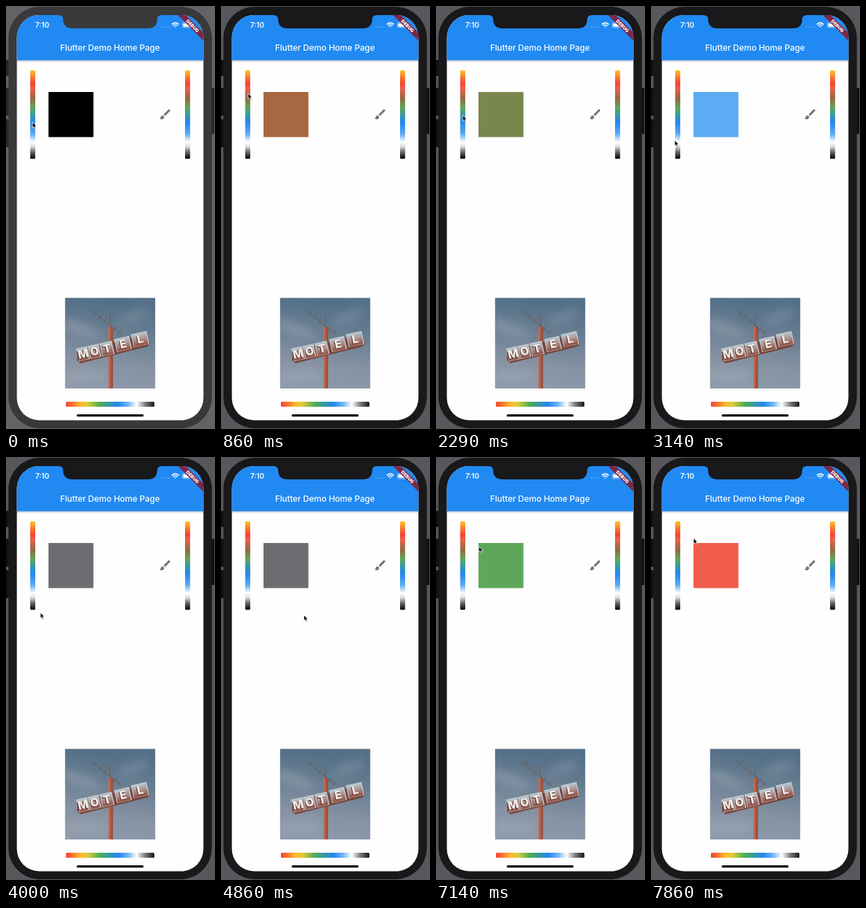
Recreate the animation shown at these times as an HTML page. Size 300 px wide and 605 px high, loop 8000 ms.

```html
<!DOCTYPE html>
<html lang="en">
<head>
<meta charset="utf-8">
<title>Color slider demo</title>
<style>
  html, body { margin: 0; width: 100%; height: 100%; overflow: hidden; background: #58585c; }
  svg { display: block; width: 100%; height: 100%; }
  text { font-family: Inter, Roboto, sans-serif; fill: #fff; }
</style>
</head>
<body>
<svg viewBox="0 0 300 605">
  <defs>
    <linearGradient id="column" x2="0" y2="1"></linearGradient>
    <linearGradient id="row"></linearGradient>
    <linearGradient id="shade" x2="0" y2="1">
      <stop stop-color="#000" stop-opacity=".25"/>
      <stop offset="1" stop-color="#000" stop-opacity="0"/>
    </linearGradient>
    <linearGradient id="sky" x2="-.15" y2="1">
      <stop stop-color="#547088"/>
      <stop offset=".35" stop-color="#6d8195"/>
      <stop offset=".65" stop-color="#8793a3"/>
      <stop offset="1" stop-color="#909caf"/>
    </linearGradient>
    <linearGradient id="panel" x2="0" y2="1">
      <stop stop-color="#b9c4cc"/>
      <stop offset=".5" stop-color="#a88e8b"/>
      <stop offset="1" stop-color="#934f43"/>
    </linearGradient>
    <linearGradient id="pole">
      <stop stop-color="#c8735a"/>
      <stop offset="1" stop-color="#93432f"/>
    </linearGradient>
    <filter id="soft" x="-50%" y="-50%" width="200%" height="200%"><feGaussianBlur stdDeviation="6"/></filter>
    <clipPath id="screen"><rect x="15.6" y="12.9" width="267.8" height="579.6" rx="32"/></clipPath>
    <clipPath id="frame"><rect x="84.8" y="417.6" width="129.4" height="129.4"/></clipPath>
  </defs>

  <rect id="desk" width="300" height="605"/>
  <g id="buttons">
    <path d="M0 77h6v23H0zM0 117h6v40H0zM0 162h6v40H0zM294 117h5v66h-5z"/>
  </g>
  <rect id="body" x="3.5" y="1" width="292" height="603" rx="45"/>

  <g clip-path="url(#screen)">
    <rect x="15" y="12" width="269" height="581" fill="#fefefe"/>
    <rect x="15" y="77" width="269" height="4" fill="url(#shade)"/>
    <rect x="15" y="12" width="269" height="65.6" fill="#2089f2"/>
    <path id="notch" d="M75 12v1q7 0 7 6 0 13 14 13h107q14 0 14-13 0-6 7-6v-1z"/>

    <text x="42" y="31.2" font-size="10.3" font-weight="600">7:10</text>
    <text x="149.2" y="64" font-size="12" font-weight="500" text-anchor="middle">Flutter Demo Home Page</text>
    <path d="M223 30h12" stroke="#8fc4f9" stroke-width="1.4" stroke-linecap="round" stroke-dasharray="0 3.6"/>
    <g fill="none" stroke="#fff" stroke-width="1.6">
      <path d="M238 26.3q5-4.4 10 0M239.8 28.4q3.2-2.8 6.4 0"/>
      <path d="M241.6 29.6L243 31.2l1.4-1.6z" fill="#fff" stroke="none"/>
    </g>
    <rect x="253" y="23.5" width="15" height="7.5" rx="2" fill="none" stroke="#a5d0fa" stroke-width=".8"/>
    <rect x="254.3" y="24.8" width="12.4" height="4.9" rx="1" fill="#fff"/>
    <g transform="translate(283.4 12.9) rotate(45)">
      <rect x="-27" y="18.1" width="54" height="7.8" fill="#7d2745"/>
      <text y="24.4" font-size="6.6" font-weight="900" text-anchor="middle">DEBUG</text>
    </g>

    <rect x="34.7" y="92" width="7.3" height="126.5" rx="1.5" fill="url(#column)"/>
    <rect x="257" y="92" width="7.3" height="126.5" rx="1.5" fill="url(#column)"/>
    <rect x="86" y="566" width="127" height="7.3" rx="1.5" fill="url(#row)"/>
    <rect id="swatch" x="61" y="123" width="64.5" height="64.5"/>
    <path transform="translate(219 145.2) scale(.8)" fill="#757575" d="M7 14c-1.66 0-3 1.34-3 3 0 1.31-1.16 2-2 2 .92 1.22 2.49 2 4 2 2.21 0 4-1.79 4-4 0-1.66-1.34-3-3-3zm13.71-9.37l-1.34-1.34c-.39-.39-1.02-.39-1.41 0L9 12.25 11.75 15l8.96-8.96c.39-.39.39-1.02 0-1.41z"/>

    <g clip-path="url(#frame)">
      <rect x="84" y="417" width="131" height="131" fill="url(#sky)"/>
      <g filter="url(#soft)">
        <ellipse cx="106" cy="462" rx="30" ry="9" fill="#8b98a7" opacity=".7" transform="rotate(20 106 462)"/>
        <ellipse cx="184" cy="444" rx="24" ry="9" fill="#8090a1" opacity=".5" transform="rotate(-20 184 444)"/>
        <ellipse cx="112" cy="528" rx="34" ry="8" fill="#a0a9b6" opacity=".5"/>
      </g>
      <path d="M122 435l44 35M149.5 442v18M126 443l6-8M133 448l6-8M140 454l5-8M154 465l5-6M160 470l5-6" stroke="#6b594f" stroke-width=".9" fill="none"/>
      <rect x="147" y="459" width="6.5" height="90" fill="url(#pole)"/>
      <path d="M102 494L200 469l7 13-4 5-96 24-5-4z" fill="#78443a"/>
      <g id="sign"></g>
    </g>
    <rect x="101.5" y="584" width="96" height="3.3" rx="1.6"/>
  </g>

  <path id="cursor" d="M0 0v8.2l1.9-1.7 1.3 2.9 1.5-.7-1.3-2.8h2.5z" stroke="#fff" stroke-width=".8"/>
</svg>

<script>
const LOOP = 8000;
const STEPS = 56;
const $ = id => document.getElementById(id);

const columnStops = [
  [0, '#ffc526'], [.08, '#f77932'], [.15, '#f4432f'], [.2, '#f15d4b'], [.32, '#94693f'], [.43, '#5ea75a'],
  [.51, '#3798a6'], [.59, '#2187f0'], [.72, '#5cabf3'], [.81, '#ffffff'], [.86, '#dfdee0'],
  [.92, '#6c6d70'], [1, '#000000']
];
const rowStops = [
  [0, '#f44336'], [.08, '#f9772e'], [.16, '#fdb62b'], [.24, '#e0cb37'], [.31, '#9abd45'], [.38, '#4caf50'],
  [.49, '#3798a6'], [.59, '#2187f0'], [.7, '#6cb4f5'], [.8, '#ffffff'], [.9, '#77777a'], [1, '#17171a']
];

// time, cursor x, cursor y, position on the column gradient
const track = [
  [0, 38, 166, 1], [290, 38, 166, 1], [430, 38, 164, .59], [1000, 39, 112, .2],
  [1290, 40, 98, .06], [1430, 41, 106, .06], [1570, 42, 126, .08], [3140, 34, 192, .72],
  [3860, 38, 222, .92], [4860, 119, 226, .92], [5860, 172, 226, .86],
  [7140, 61.5, 128, .43], [7860, 61, 116, .2], [8000, 61, 116, .2]
];

// Linear lookup in rows sorted by their first entry
function lerpRows(rows, key) {
  const i = Math.max(1, rows.findIndex(row => row[0] >= key));
  const a = rows[i - 1], b = rows[i];
  const k = (key - a[0]) / (b[0] - a[0]);
  return a.slice(1).map((v, n) => v + (b[n + 1] - v) * k);
}

const rgb = hex => [1, 3, 5].map(i => parseInt(hex.slice(i, i + 2), 16));
const columnRgb = columnStops.map(([at, hex]) => [at, ...rgb(hex)]);

function fillGradient(id, stops) {
  $(id).innerHTML = stops.map(([at, c]) => `<stop offset="${at}" stop-color="${c}"/>`).join('');
}

function play(id, frameAt) {
  const frames = [];
  for (let i = 0; i <= STEPS; i++) {
    if (i === 1) continue; // the opening pose lasts two ticks
    const time = Math.round(i * LOOP / STEPS / 10) * 10;
    frames.push({ ...frameAt(time), offset: time / LOOP, easing: 'step-end' });
  }
  $(id).animate(frames, { duration: LOOP, iterations: Infinity });
}

fillGradient('column', columnStops);
fillGradient('row', rowStops);

const letters = [['M', 110.5, 497.5, 16], ['O', 127, 494, 16], ['T', 145, 490, 18], ['E', 168, 483.5, 22], ['L', 192.5, 476.5, 23]];
$('sign').innerHTML = letters.map(([letter, x, y, w]) => `
  <g transform="translate(${x} ${y}) rotate(-13)" font-size="16" text-anchor="middle">
    <rect x="${-w / 2}" y="-9.5" width="${w}" height="19" fill="#c0cad1"/>
    <rect x="${1 - w / 2}" y="-8" width="${w - 2.5}" height="17" fill="url(#panel)"/>
    <text x="-1" y="6.4" font-weight="900" style="fill:#603029">${letter}</text>
    <text y="5.6" font-weight="800" style="fill:#f3eee9">${letter}</text>
  </g>`).join('');

play('cursor', time => {
  const [x, y] = lerpRows(track, time);
  return { transform: `translate(${x}px, ${y}px)` };
});
play('swatch', time => ({ fill: `rgb(${lerpRows(columnRgb, lerpRows(track, time)[2]).map(Math.round)})` }));

const dimmed = (before, after) => time => ({ fill: time < 290 ? before : after });
play('desk', dimmed('#636367', '#58585c'));
play('buttons', dimmed('#272729', '#111113'));
play('body', dimmed('#39393b', '#19181a'));
play('notch', dimmed('#39393b', '#19181a'));
</script>
</body>
</html>
```
